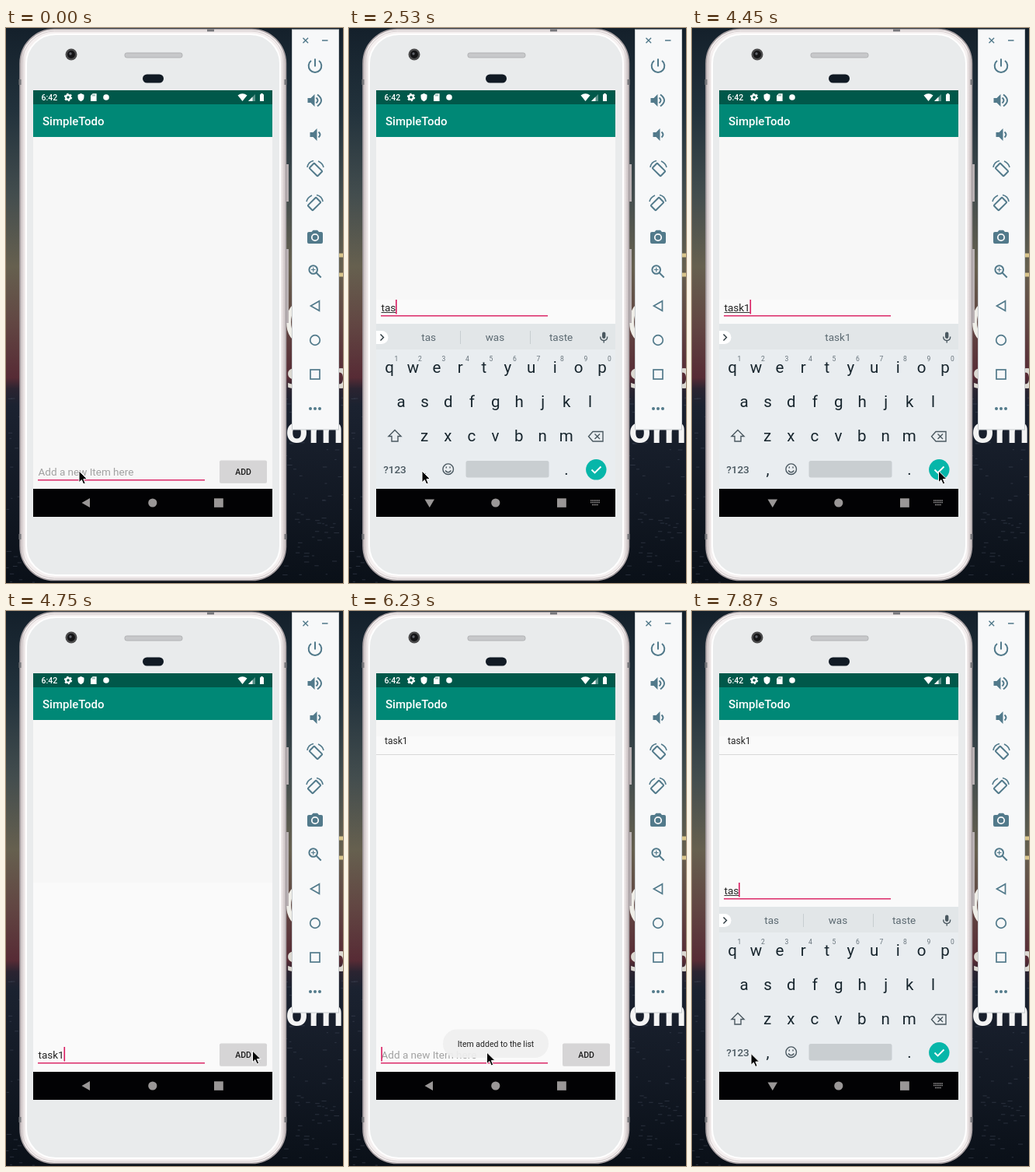
An HTML page that plays this animation: 434x713 px, repeating every 8000 ms.

```html
<!DOCTYPE html>
<html lang="en">
<head>
<meta charset="utf-8">
<title>Todo app demo</title>
<style>
  html, body { margin: 0; width: 100%; height: 100%; overflow: hidden; background: #10161f; }
  svg { display: block; width: 100%; height: 100%; }
  text { font-family: Roboto, Arial, sans-serif; white-space: pre; }
  .mid { text-anchor: middle; }
  .medium { font-weight: 500; }
  .field { font-size: 13.5px; }
  .key { font-size: 20.5px; fill: #17252d; }
  .digit { font-size: 8.5px; fill: #66727a; }
  .word { font-size: 13.5px; fill: #5c6a72; }
  .line { fill: none; stroke: #4a5860; stroke-width: 1.4; }
  .panel .line { stroke: #527a8b; stroke-width: 2; }
  .scenery text { font-family: "Open Sans", Arial, sans-serif; font-weight: 700; font-size: 47px; }
</style>
</head>
<body>
<svg viewBox="0 0 434 713">
  <defs>
    <linearGradient id="sky" x2="0" y2="1">
      <stop offset="0" stop-color="#14202b"/>
      <stop offset=".15" stop-color="#22323c"/>
      <stop offset=".3" stop-color="#434d4e"/>
      <stop offset=".43" stop-color="#66604f"/>
      <stop offset=".53" stop-color="#624743"/>
      <stop offset=".63" stop-color="#572b35"/>
      <stop offset=".65" stop-color="#2b2431"/>
      <stop offset=".68" stop-color="#1b2230"/>
      <stop offset="1" stop-color="#0a1018"/>
    </linearGradient>
    <linearGradient id="edge">
      <stop offset="0" stop-color="#c6bcbd"/>
      <stop offset=".02" stop-color="#f5f0f0"/>
      <stop offset=".98" stop-color="#f5f0f0"/>
      <stop offset="1" stop-color="#c6bcbd"/>
    </linearGradient>
    <clipPath id="aboveNav"><rect x="35" y="140" width="308" height="452"/></clipPath>
  </defs>

  <g class="scenery">
    <rect width="434" height="713" fill="url(#sky)"/>
    <g id="waves" stroke="#4b5364" stroke-width="1" opacity=".45"></g>
    <ellipse cx="380" cy="378" rx="16" ry="24" fill="none" stroke="#efeee8" stroke-width="6"/>
    <path d="M424 292h10M424 317h10" stroke="#d9c58c" stroke-width="5"/>
    <text x="361" y="463" fill="#dcd9d2">sopo</text>
    <text x="360" y="533" fill="#f3f3f3">ome</text>
  </g>

  <g class="phone">
    <path d="M362.500 175v48M362.500 284v95" stroke="#b9b1b3" stroke-width="3"/>
    <rect x="18" y="1.500" width="342.500" height="708" rx="44" fill="url(#edge)" stroke="#a79fa2" stroke-width="1.500"/>
    <rect x="20.500" y="4" width="337.500" height="703" rx="42" fill="none" stroke="#d4cccd"/>
    <rect x="26" y="8" width="327" height="695" rx="38" fill="#e9ebec" stroke="#fff" stroke-width="2"/>
    <path d="M259 3h9M18 66v7M18 650v7M360 66v7M360 650v7" stroke="#77777b" stroke-width="3"/>
    <circle cx="84" cy="34" r="7.500" fill="#4a4a4b"/>
    <circle cx="84" cy="34" r="5" fill="#141416"/>
    <circle cx="83" cy="33" r="1.700" fill="#60636a"/>
    <rect x="153" y="32" width="74" height="6" rx="2.500" fill="#c7c8ca" stroke="#b1b2b4"/>
    <rect x="176" y="59.500" width="27" height="11" rx="5.500" fill="#111a24"/>
  </g>

  <g class="screen">
    <rect x="35" y="80" width="308" height="548" fill="#f7f7f7"/>
    <rect id="fresh" x="35" width="308" fill="#fafafa"/>
    <rect x="35" y="80" width="308" height="18" fill="#00584a"/>
    <rect x="35" y="98" width="308" height="42" fill="#008876"/>
    <g fill="#fff">
      <text class="medium" x="45.500" y="93" font-size="10.500">6:42</text>
      <text class="medium" x="47" y="125" font-size="15">SimpleTodo</text>
      <circle cx="80" cy="89" r="2.900" fill="none" stroke="#fff" stroke-width="2.300"/>
      <circle cx="80" cy="89" r="4.500" fill="none" stroke="#fff" stroke-width="1.400" stroke-dasharray="2.350"/>
      <path d="M96.500 84l4 1.700v3q0 4-4 5.500q-4-1.500-4-5.500v-3z"/>
      <path d="M109 87l2.600-2.700h5V94H109z"/>
      <path d="M112 85.500v2M114 85.500v2" stroke="#00584a" stroke-width=".8"/>
      <circle cx="129" cy="89" r="3.800"/>
      <path d="M298.500 86.500q6-4.500 12 0L304.500 94z"/>
      <path d="M312 94l9-9v9z" opacity=".35"/><path d="M312 94l5.500-5.500V94z"/>
      <path d="M327 85.200h1.300V84h2.400v1.200h1.300V94h-5z"/>
    </g>

    <g id="item">
      <text x="46" y="171" font-size="12" fill="#252525">task1</text>
      <path d="M35 184.500h307" stroke="#d8d8d8"/>
    </g>

    <g id="editor">
      <text id="hint" class="field" x="41.500" y="575" fill="#a2a2a2">Add a new Item here</text>
      <text id="typed" class="field" x="41.500" y="575" fill="#222"></text>
      <path id="composing" stroke="#333" stroke-width="1"/>
      <path d="M41 580.800h215" stroke="#dc2a69" stroke-width="1.600"/>
      <rect id="caret" y="560" width="1.600" height="18.500" fill="#d81b60"/>
      <g id="button">
        <rect x="275" y="556.500" width="61" height="28.500" rx="2" fill="#000" opacity=".12"/>
        <rect x="275" y="555.500" width="61" height="28.500" rx="2" fill="#d6d5d6"/>
        <text class="mid medium" x="305.500" y="573.500" font-size="10.500" fill="#1c1c1c">ADD</text>
      </g>
    </g>

    <g clip-path="url(#aboveNav)">
      <g id="keyboard">
        <rect x="35" y="380" width="308" height="212" fill="#e9edf0"/>
        <rect x="35" y="380" width="308" height="33" fill="#e2e6e8"/>
        <path d="M35 389h7a8 8 0 0 1 0 17h-7z" fill="#fff"/>
        <path class="line" d="M40.500 393.500l4 4-4 4" style="stroke:#27343b"/>
        <g id="words"></g>
        <g id="mic">
          <rect x="326" y="390.500" width="4.400" height="8.500" rx="2.200" fill="#4a5860"/>
          <path class="line" d="M323.700 396.500q0 5 4.500 5t4.500-5M328.200 401.500v3"/>
        </g>
        <g id="keys"></g>
        <path class="line" d="M59 516.500l8 8h-4v6.500h-8v-6.500h-4z"/>
        <path class="line" d="M314 518.500h13v12.500h-13l-5.500-6.300zM316.500 521.500l6.500 6.500m0-6.500l-6.500 6.500"/>
        <text class="mid medium" x="59" y="572" font-size="13.500" fill="#4a5860">?123</text>
        <circle class="line" cx="127.700" cy="566.700" r="6.800"/>
        <path class="line" d="M124 568.500q3.700 4.500 7.400 0M125.300 563.500v2M130 563.500v2"/>
        <rect x="150.500" y="556" width="107" height="21.500" rx="2.500" fill="#c9ced1"/>
        <circle cx="318.300" cy="567.300" r="13.200" fill="#06b6a9"/>
        <path d="M312.500 567.500l4 4 8-8" fill="none" stroke="#fff" stroke-width="1.900"/>
      </g>
    </g>

    <g id="toast">
      <rect x="121" y="537.500" width="136" height="36.500" rx="18" fill="#efefef" opacity=".93"/>
      <text class="mid" x="189" y="559.800" font-size="10.500" fill="#242424">Item added to the list</text>
    </g>

    <rect x="35" y="592" width="308" height="36" fill="#020204"/>
    <g fill="#9a9797">
      <path id="back" d="M97.500 610l10.500-6v12z"/>
      <circle cx="188.800" cy="610" r="5.600"/>
      <rect x="268" y="604.300" width="11.800" height="11.500"/>
      <g id="down">
        <path d="M97.500 605.500h12.500l-6.250 10.500z"/>
        <path d="M311 607h12M311 609.500h12M313 612.500h8" stroke="#9a9797" stroke-width="1.300" stroke-dasharray="1.400 .7"/>
      </g>
    </g>
  </g>

  <g class="panel">
    <rect x="368.500" y="2" width="60" height="514" fill="#f7f8f9" stroke="#c9cdd0"/>
    <path class="line" d="M382.500 12.700l6.600 6.600m0-6.600l-6.600 6.600M407 16h7.500" style="stroke-width:1.400"/>
    <path class="line" d="M398 39.500v10M393 42a8.300 8.300 0 1 0 10 0"/>
    <g fill="#527a8b">
      <path d="M388.500 90h4l5-5v16l-5-5h-4z"/>
      <path d="M391.500 134h4l5-5v16l-5-5h-4z"/>
      <path d="M390 262h3.500l2-2.200h5.500l2 2.200h3q2 0 2 2v11q0 2-2 2h-16q-2 0-2-2v-11q0-2 2-2z"/>
      <circle cx="392" cy="489" r="2"/><circle cx="398" cy="489" r="2"/><circle cx="404" cy="489" r="2"/>
    </g>
    <circle cx="398" cy="269" r="4.200" fill="#527a8b" stroke="#f7f8f9" stroke-width="1.800"/>
    <path class="line" d="M399.500 89.500q4 3.500 0 7M401 85.500q10 7.500 0 15M402.500 133.500q4 3.500 0 7"/>
    <g id="turn">
      <rect class="line" x="-4.500" y="-7.500" width="9" height="15" rx="1" transform="translate(399 182) rotate(-45)"/>
      <path class="line" d="M388 179q1-7 8-8.500M402 171q6 3 7 8" style="stroke-width:1.600"/>
    </g>
    <g transform="translate(796 44) scale(-1 1)">
      <rect class="line" x="-4.500" y="-7.500" width="9" height="15" rx="1" transform="translate(399 182) rotate(-45)"/>
      <path class="line" d="M388 179q1-7 8-8.500M402 171q6 3 7 8" style="stroke-width:1.600"/>
    </g>
    <circle class="line" cx="395.700" cy="310.500" r="5.300"/>
    <path class="line" d="M399.700 314.500l6 6"/>
    <path class="line" d="M392.900 310.500h5.600M395.700 307.700v5.600" style="stroke-width:1.200"/>
    <path class="line" d="M403.500 350.800v12.400l-11-6.200z" style="stroke-width:1.700"/>
    <circle class="line" cx="398" cy="401" r="6.300" style="stroke-width:1.700"/>
    <rect class="line" x="392" y="439" width="12" height="12" style="stroke-width:1.700"/>
  </g>

  <path id="pointer" d="M0 0V14.800L3.400 11.600 5.700 17 8.200 15.900 5.900 10.600H10.600Z" fill="#050505" stroke="#fff" stroke-width="1"/>
</svg>

<script>
const $ = id => document.getElementById(id);
const show = (id, on) => $(id).setAttribute('visibility', on ? 'visible' : 'hidden');
const label = (cls, x, y, s) => `<text class="mid ${cls}" x="${x}" y="${y}">${s}</text>`;

const keyRow = (letters, x, y) =>
  [...letters].map((c, i) => label('key', x + i * 30.45, y, c)).join('');

$('keys').innerHTML =
  keyRow('qwertyuiop', 52, 442.5) + keyRow('asdfghjkl', 67, 486.5) + keyRow('zxcvbnm', 97, 530.5) +
  [...'1234567890'].map((d, i) => label('digit', 61 + i * 30.5, 427.5, d)).join('') +
  label('key', 97.5, 574, ',') + label('key', 280, 574, '.');

// Sea glints from a small seeded generator.
let seed = 7;
const random = () => (seed = seed * 16807 % 2147483647) / 2147483647;
$('waves').innerHTML = Array.from({ length: 330 }, () => {
  const x = random() * 434, y = 466 + random() * 247;
  return `<path d="M${x.toFixed(1)} ${y.toFixed(1)}h${(2 + random() * 5).toFixed(1)}"/>`;
}).join('');

const tas = ['tas', 'was', 'taste'];
const start = {
  text: '', caret: 0, raised: 0, keyboard: 0, words: [], item: 0, toast: 0, fresh: 592, at: [94, 569]
};
// Each entry lists what changes at that moment.
const timeline = [
  [150, { caret: 1 }],
  [600, { caret: 0 }],
  [1050, { caret: 1 }],
  [1190, { text: 't', raised: 1, fresh: 349 }],
  [1330, { text: 'ta', keyboard: 1 }],
  [1480, { text: 'tas', words: tas }],
  [1930, { caret: 0 }],
  [2530, { caret: 1 }],
  [2670, { text: 'task', words: ['tasks', 'task', 'talk'] }],
  [3120, { caret: 0 }],
  [3410, { text: 'task1', caret: 1, words: ['', 'task1', ''] }],
  [3860, { caret: 0 }],
  [4010, { at: [135, 573] }],
  [4160, { at: [228, 575] }],
  [4300, { at: [302, 570], caret: 1 }],
  [4450, { at: [317.5, 569] }],
  [4600, { raised: 0, keyboard: .45 }],
  [4750, { keyboard: 0, words: [], at: [317.5, 565] }],
  [4900, { caret: 0 }],
  [5040, { text: '', caret: 1, item: 1, fresh: 161 }],
  [5190, { toast: .35 }],
  [5330, { toast: .8 }],
  [5480, { toast: 1, caret: 0 }],
  [5630, { at: [300, 566] }],
  [5780, { at: [245, 567] }],
  [5930, { at: [198, 567], caret: 1 }],
  [6080, { at: [180, 567] }],
  [6230, { at: [177.5, 567] }],
  [6380, { at: [150, 573], caret: 0 }],
  [6530, { at: [108, 575] }],
  [6670, { at: [83, 571] }],
  [6820, { at: [76, 568.5], caret: 1 }],
  [7270, { caret: 0 }],
  [7420, { text: 't', caret: 1, raised: 1, toast: .5 }],
  [7570, { text: 'ta', keyboard: 1, toast: 0 }],
  [7720, { text: 'tas' }],
  [7870, { words: tas }]
];

function stateAt(t) {
  return Object.assign({}, start, ...timeline.filter(([at]) => at <= t).map(([, change]) => change));
}

function draw(s) {
  $('fresh').setAttribute('y', s.fresh);
  $('fresh').setAttribute('height', 592 - s.fresh);
  $('typed').textContent = s.text;
  const end = 41.5 + (s.text ? $('typed').getComputedTextLength() : 0);
  $('caret').setAttribute('x', end - .2);
  $('composing').setAttribute('d', s.raised ? `M41.5 576.5H${end}` : '');
  $('editor').setAttribute('transform', `translate(0 ${s.raised ? -211 : 0})`);
  $('keyboard').setAttribute('transform', `translate(0 ${(1 - s.keyboard) * 212})`);
  $('words').innerHTML = s.words.map((w, i) => label('word', 102.7 + i * 85.2, 402.3, w)).join('') +
    (s.words[0] ? '<path d="M143.500 389v17M233.500 389v17" stroke="#c7cdd0"/>' : '');
  $('toast').setAttribute('opacity', s.toast);
  $('pointer').setAttribute('transform', `translate(${s.at})`);
  show('hint', !s.text);
  show('caret', s.caret);
  show('button', !s.raised);
  show('item', s.item);
  show('keyboard', s.keyboard);
  show('back', !s.raised);
  show('down', s.raised);
}

function tick() {
  draw(stateAt(performance.now() % 8000));
  requestAnimationFrame(tick);
}
tick();
</script>
</body>
</html>
```
